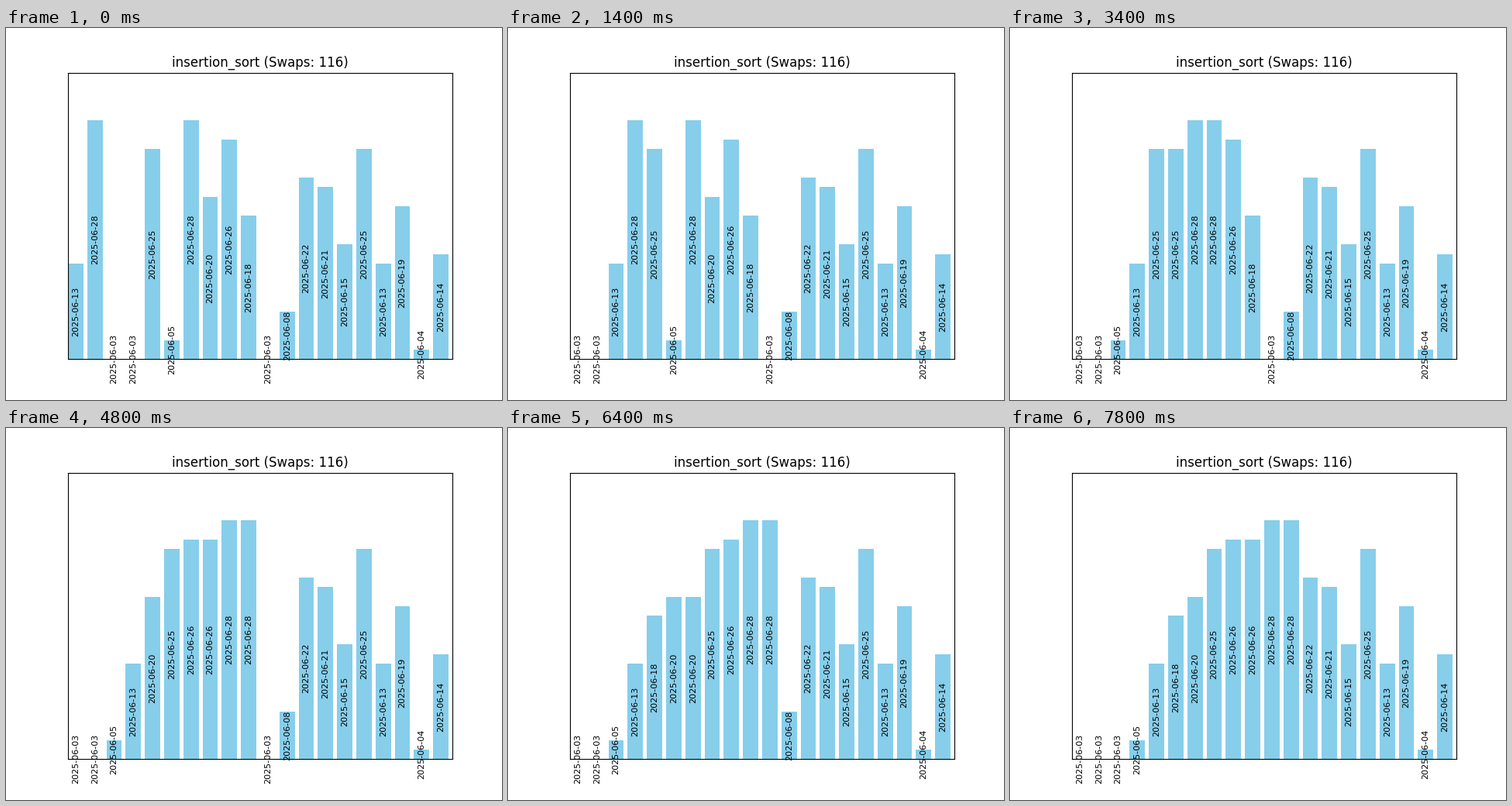
Animation, 640 px wide and 480 px high, one loop 8 s. Source, as a matplotlib script:

```python
from itertools import islice

import matplotlib.pyplot as plt
from matplotlib.animation import FuncAnimation

FRAMES, INTERVAL = 40, 200
FIRST_DAY = 3
DAYS = [13, 28, 3, 3, 25, 5, 28, 20, 26, 18, 3, 8, 22, 21, 15, 25, 13, 19, 4, 14]


def insertion_sort(days):
    """Yield the list at the start and after every single write."""
    days = list(days)
    yield list(days)
    for i in range(1, len(days)):
        key, j = days[i], i
        while j > 0 and days[j - 1] > key:
            days[j] = days[j - 1]
            j -= 1
            yield list(days)
        days[j] = key
        yield list(days)


states = list(islice(insertion_sort(DAYS), FRAMES))

plt.rcParams["font.family"] = "DejaVu Sans"
fig, ax = plt.subplots(figsize=(6.4, 4.8), dpi=100)
ax.set(xlim=(0, len(DAYS)), ylim=(0, 30), xticks=[], yticks=[])
ax.set_title("insertion_sort (Swaps: 116)", fontsize=12)

bars = ax.bar(range(len(DAYS)), [0] * len(DAYS), width=0.8, align="edge", color="skyblue")
labels = [ax.text(i + 0.4, 0, "", fontsize=8, rotation=90, ha="center", va="center")
          for i in range(len(DAYS))]


def draw(frame):
    for day, bar, label in zip(states[frame], bars, labels):
        height = day - FIRST_DAY
        bar.set_height(height)
        label.set_y(height / 2)
        label.set_text(f"2025-06-{day:02d}")
    return [*bars, *labels]


anim = FuncAnimation(fig, draw, frames=FRAMES, interval=INTERVAL, repeat=True, repeat_delay=0)
plt.show()
```
